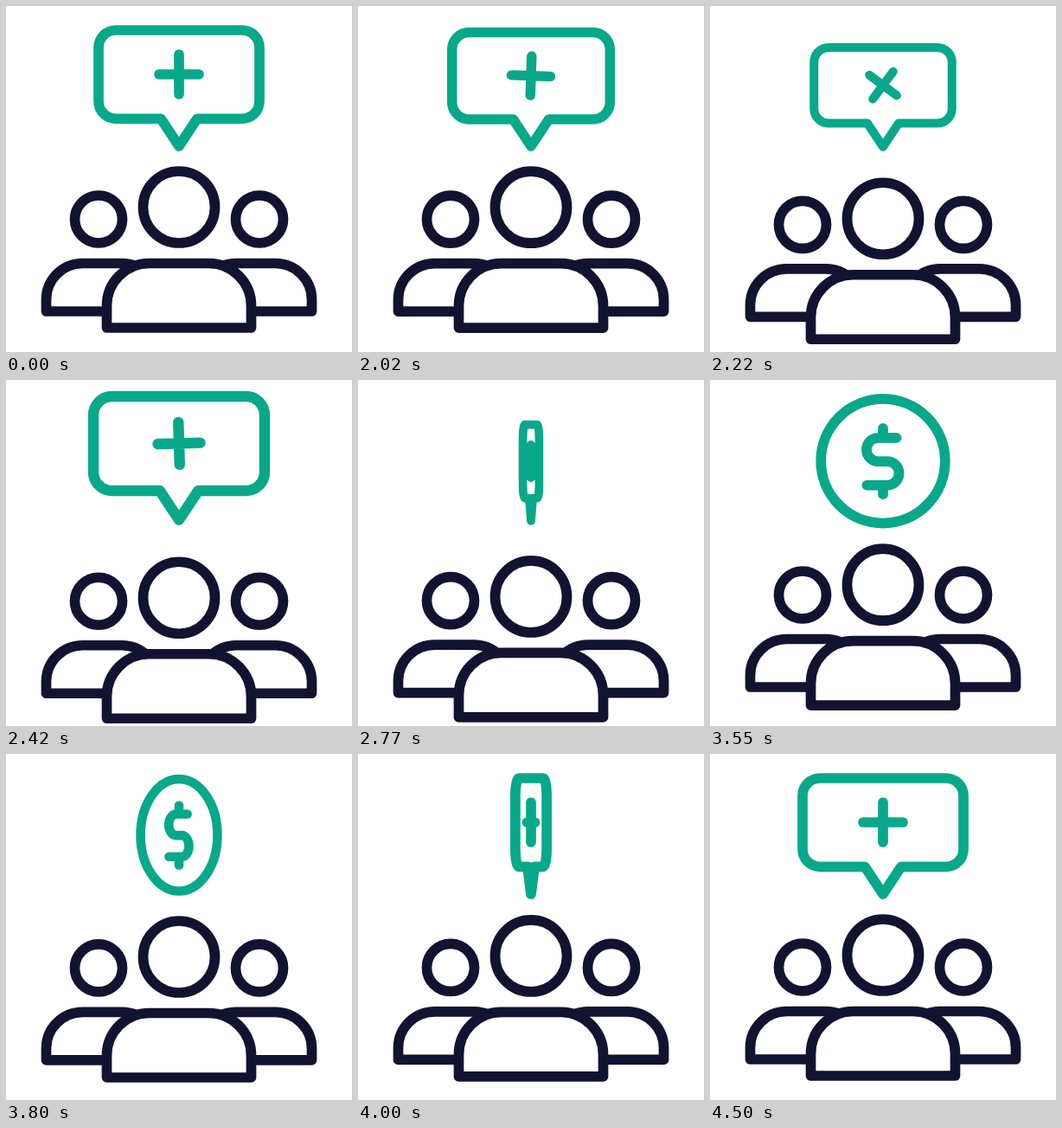
Animation of 400 by 400 pixels, one loop 4520 ms. Source, as an HTML page:

```html
<!DOCTYPE html>
<html lang="en">
<head>
<meta charset="utf-8">
<title>Team finance</title>
<style>
  html, body { margin: 0; width: 100%; height: 100%; overflow: hidden; background: #fff; }
  svg { display: block; width: 100vw; height: 100vh; }
  .line { stroke-width: 11.7; stroke-linecap: round; stroke-linejoin: round; }
</style>
</head>
<body>
<svg viewBox="0 0 400 400">
  <g class="line" fill="#fff" stroke="#121331">
    <g id="sides">
      <circle cx="107" cy="246.5" r="27.5"/>
      <circle cx="293" cy="246.5" r="27.5"/>
      <path d="M46.5 353V339.5A42 42 0 0 1 88.5 297.5H134A42 42 0 0 1 176 339.5V353Z"/>
      <path d="M353.5 353V339.5A42 42 0 0 0 311.5 297.5H266A42 42 0 0 0 224 339.5V353Z"/>
    </g>
    <g id="middle">
      <circle cx="200" cy="232.5" r="41.5"/>
      <path d="M116.5 372V346.5A49 49 0 0 1 165.5 297.5H234.5A49 49 0 0 1 283.5 346.5V372Z"/>
    </g>
  </g>
  <g class="line" fill="none" stroke="#08a88a">
    <path id="bubble"/>
    <path id="coin"/>
  </g>
</svg>
<script>
const LOOP = 4520;
const el = id => document.getElementById(id);
const sides = el('sides'), middle = el('middle'), bubble = el('bubble'), coin = el('coin');

const clamp = x => Math.min(1, Math.max(0, x));
const span = (t, a, b) => clamp((t - a) / (b - a));
const smooth = x => x * x * (3 - 2 * x);

// cubic-bezier(.3, 0, .3, 1)
function ease(x) {
  let lo = 0, hi = 1;
  for (let i = 0; i < 24; i++) {
    const s = (lo + hi) / 2;
    if (0.9 * s * (1 - s) + s * s * s < x) lo = s; else hi = s;
  }
  return smooth(lo);
}

// keys: [time, value] pairs, eased between neighbours
function track(t, keys) {
  let v = keys[0][1];
  for (let i = 1; i < keys.length; i++) {
    const [a, from] = keys[i - 1], [b, to] = keys[i];
    if (t >= a) v = from + (to - from) * ease(span(t, a, b));
  }
  return v;
}

const DIP = [[2000, 0], [2500, 19.6], [4470, 0]];
const BUBBLE_SCALE = [[2000, 1], [2165, 0.82], [2500, 1.074], [2980, 0.78]];
const COIN_SCALE = [[2500, 1.074], [2980, 0.78], [3500, 1.013], [3900, 0.9]];

function zoom(node, s, y) {
  node.setAttribute('transform', `translate(200 ${y}) scale(${s}) translate(-200 ${-y})`);
}

// Widths are squeezed in the geometry so the line weight stays even.
function bubblePath(w, turn) {
  const x = d => (200 + d * w).toFixed(2);
  const r = 20, rx = (r * w).toFixed(2);
  const arc = (dx, y) => `A${rx} ${r} 0 0 1 ${x(dx)} ${y}`;
  const arm = a => {
    const dx = 23 * Math.cos(a), dy = 23 * Math.sin(a);
    return `M${x(-dx)} ${79 - dy}L${x(dx)} ${79 + dy}`;
  };
  return `M${x(-73)} 28H${x(73)}${arc(93, 48)}V110.3${arc(73, 130.3)}H${x(21)}` +
    `L200 162L${x(-21)} 130.3H${x(-73)}${arc(-93, 110.3)}V48${arc(-73, 28)}Z` +
    arm(turn) + arm(turn + Math.PI / 2);
}

function coinPath(w) {
  const x = d => (200 + d * w).toFixed(2);
  const rx = (71.5 * w).toFixed(2), bend = (13.5 * w).toFixed(2);
  return `M${x(-71.5)} 93.7A${rx} 71.5 0 1 1 ${x(71.5)} 93.7A${rx} 71.5 0 1 1 ${x(-71.5)} 93.7Z` +
    `M${x(15.5)} 67H${x(-5.5)}A${bend} 13.6 0 0 0 ${x(-5.5)} 94.2H${x(5)}` +
    `A${bend} 13.6 0 0 1 ${x(5)} 121.4H${x(-18.5)}M200 56V67M200 121.4V132`;
}

function draw(t) {
  const dip = track(t, DIP);
  middle.setAttribute('transform', `translate(0 ${dip})`);
  sides.setAttribute('transform', `translate(0 ${dip * 0.48})`);

  const half = smooth(span(t, 2500, 3080)) + smooth(span(t, 3480, 4440));
  const face = Math.cos(half * Math.PI);
  const w = Math.max(0.02, Math.abs(face));
  const showCoin = face < 0;
  bubble.style.display = showCoin ? 'none' : '';
  coin.style.display = showCoin ? '' : 'none';

  if (showCoin) {
    coin.setAttribute('d', coinPath(w));
    zoom(coin, track(t, COIN_SCALE), 93.7);
  } else {
    bubble.setAttribute('d', bubblePath(w, Math.PI * ease(span(t, 2000, 2480))));
    zoom(bubble, t > 3500 ? 1 : track(t, BUBBLE_SCALE), 167.5);
  }
}

let start = null;
function tick(now) {
  if (start === null) start = now;
  const t = (now - start) % LOOP;
  draw(Math.floor((t + 5) / 25) * 25);
  requestAnimationFrame(tick);
}
draw(0);
requestAnimationFrame(tick);
</script>
</body>
</html>
```
